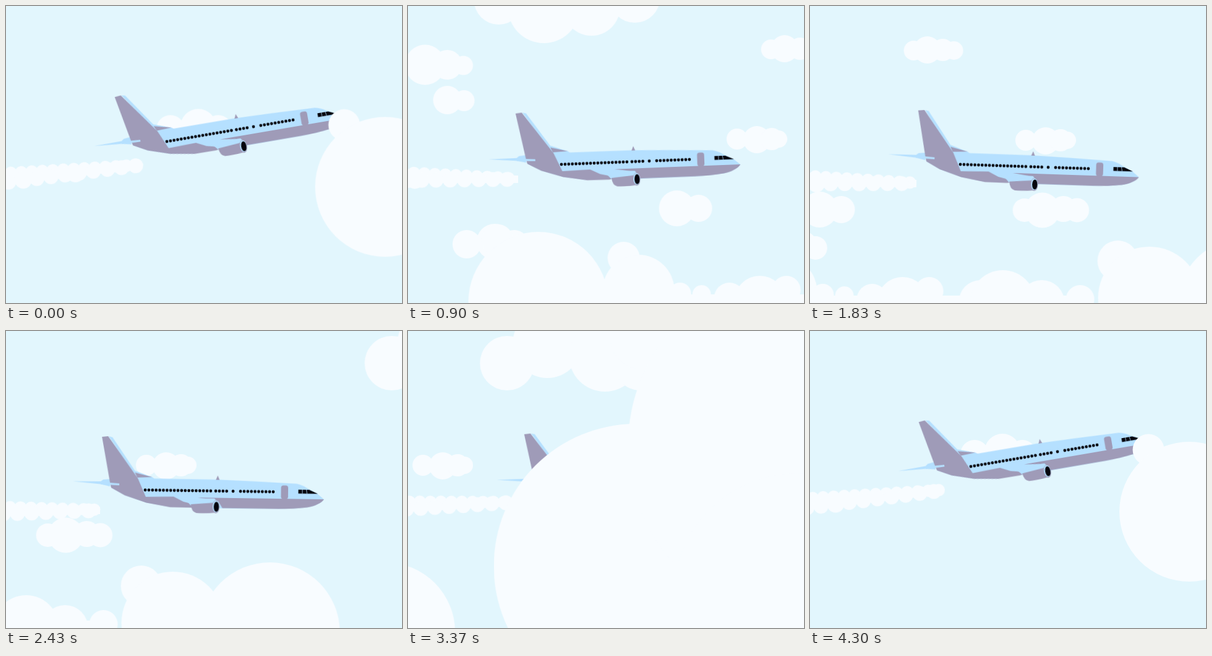
Recreate the animation shown at these times as an HTML page without scripts. Size 640 px wide and 480 px high, loop 4330 ms.

```html
<!DOCTYPE html>
<html lang="en">
<head>
<meta charset="utf-8">
<title>Plane in the clouds</title>
<style>
html, body { margin: 0; width: 100%; height: 100%; overflow: hidden; background: #e2f6fd; }
svg { display: block; width: 100vw; height: 100vh; }
.cloud { fill: #f8fcff; }
.light { fill: #b5e0ff; }
.grey { fill: #9f9bb8; }
.black { fill: #05050d; }
.anim { animation: 4330ms linear infinite; }
.near { animation-name: near; }
.far { animation-name: far; }
.pan { animation-name: pan; }
.cover { animation-name: cover; }
.plane { animation-name: plane; }
.engine { animation-name: engine; }
.trail { animation-name: trail; }
.puffs { animation-name: puffs; fill: none; stroke: #f8fcff; stroke-linecap: round; }
.windows { fill: none; stroke: #05050d; stroke-width: 4.8; stroke-linecap: round; stroke-dasharray: 0 5.88; }

/* the scene changes while the big clouds hide the plane */
@keyframes near {
  0% { transform: translateX(402px); }
  20.785% { transform: translateX(0); }
  42.263% { transform: translateX(-419px); }
  56.12% { transform: translateX(-698px); }
  69.284% { transform: translateX(-977px); }
  83.8% { transform: translateX(-1290px); }
  83.81% { transform: translateX(717px); }
  99.307%, 100% { transform: translateX(402px); }
}
@keyframes far {
  0% { transform: translateX(171px); }
  20.785% { transform: translateX(0); }
  42.263% { transform: translateX(-183px); }
  56.12% { transform: translateX(-305px); }
  69.284% { transform: translateX(-427px); }
  83.8% { transform: translateX(-564px); }
  83.81% { transform: translateX(308px); }
  99.307%, 100% { transform: translateX(171px); }
}
@keyframes pan {
  0% { transform: translateY(-186px); animation-timing-function: cubic-bezier(.35, .5, .65, 1); }
  20.785% { transform: translateY(0); }
  42.263%, 83.8% { transform: translateY(2px); }
  83.81% { transform: translateY(-416px); }
  99.307%, 100% { transform: translateY(-186px); }
}
@keyframes cover {
  0%, 69.284% { transform: translateX(945px); }
  83.834% { transform: translateX(0); }
  100% { transform: translateX(-1123px); }
}
@keyframes plane {
  0% { transform: translate(260px, 219px) rotate(-9.7deg); animation-timing-function: cubic-bezier(.3, .2, .6, .9); }
  20.785% { transform: translate(248px, 256px) rotate(-2.2deg); animation-timing-function: cubic-bezier(.3, .3, .6, 1); }
  42.263% { transform: translate(243px, 256px) rotate(1.9deg); animation-timing-function: ease-in-out; }
  56.12% { transform: translate(225px, 257px) rotate(.8deg); animation-timing-function: ease-in-out; }
  69.284% { transform: translate(260px, 251px) rotate(-1.1deg); }
  83.8% { transform: translate(262px, 249px) rotate(-2deg); }
  83.81% { transform: translate(232px, 226px) rotate(-9.7deg); }
  99.307%, 100% { transform: translate(260px, 219px) rotate(-9.7deg); }
}
@keyframes engine {
  0%, 42.263% { transform: translate(0, 0); }
  56.12%, 83.8% { transform: translate(-6px, -3px); }
  83.81%, 100% { transform: translate(0, 0); }
}
@keyframes trail {
  0% { transform: translate(212px, 258px) rotate(-5.7deg); }
  20.785% { transform: translate(178px, 280px) rotate(1deg); }
  42.263% { transform: translate(172px, 287px) rotate(1.5deg); animation-timing-function: ease-in-out; }
  56.12% { transform: translate(152px, 290px) rotate(-.5deg); animation-timing-function: ease-in-out; }
  69.284% { transform: translate(163px, 278px) rotate(-2deg); }
  83.8% { transform: translate(165px, 277px) rotate(-2deg); }
  83.81% { transform: translate(184px, 265px) rotate(-5.7deg); }
  99.307%, 100% { transform: translate(212px, 258px) rotate(-5.7deg); }
}
@keyframes puffs { to { stroke-dashoffset: -1955px; } }
</style>
</head>
<body>
<svg viewBox="0 0 640 480" preserveAspectRatio="none">
  <rect width="640" height="480" fill="#e2f6fd"/>

  <!-- far clouds -->
  <g class="anim pan cloud"><g class="anim far">
    <circle cx="95" cy="385" r="23"/>
    <circle cx="140" cy="381" r="29"/>
    <circle cx="172" cy="385" r="23"/>
    <circle cx="192" cy="389" r="19"/>
    <circle cx="532" cy="215" r="17"/>
    <circle cx="564" cy="216" r="22"/>
    <circle cx="588" cy="215" r="18"/>
    <circle cx="599" cy="215" r="14"/>
  </g></g>

  <!-- vapour trail -->
  <g class="anim trail">
    <path class="cloud" d="M0-6L-230-9V10L0 6Z"/>
    <path class="anim puffs" stroke-width="20" stroke-dasharray="0 17" d="M0-1L-240-10"/>
    <path class="anim puffs" stroke-width="24" stroke-dasharray="0 23" d="M-2 0L-240 7"/>
    <path class="anim puffs" stroke-width="28" stroke-dasharray="0 85" d="M-100 3L-240 6"/>
  </g>

  <!-- plane, with the first window at 0,0 -->
  <g class="anim plane">
    <path class="light" d="M-117-12.5L-72-13L-68-16L-57-17V-5L-72-8.5Z"/>
    <path class="light" d="M-57-12L-20-18.7L115-18.6L175-16.5L245-13.4Q255-11 260-7.6L278 2L289 11Q286 16 280 18.5Q272 23 262 24.5Q240 27.5 215 27.5L120 28L75 27L41 27L2 20.5L-33 9L-55-3Z"/>
    <path class="light" d="M-60-86L-54-84.5L-17-31L11-21L15-18H-14Z"/>
    <path class="grey" d="M-17-28L11-21L-13-20Z"/>
    <path class="grey" d="M-71-85L-61-86L-12-18.5L1 11L46 10L62 18L92 25L76 27.5L41 27.3L2 20.5L-33 9L-55-3L-57-11Z"/>
    <path class="light" d="M-72-12L-42-10V-7L-72-8Z"/>
    <path class="grey" d="M85 11H289Q286 16 280 18.5Q272 23 262 24.5Q240 27.5 215 27.5H125L118 16Z"/>
    <path class="grey" d="M114-18L117-25L120-18Z"/>
    <path class="windows" d="M0 0H106.5M114 0H132M142 0h1M154 0H207.5"/>
    <rect class="grey" x="219.5" y="-10.5" width="11.5" height="22" rx="4"/>
    <path class="black" d="M247.5-4H265L279 2.2H247.5Z"/>
    <path d="M254-4V2.2M260.5-4L261.5 2.2" stroke="#b5e0ff" stroke-width=".8"/>
    <g class="anim engine">
      <path class="light" d="M70 16L118 15L122 20L118 28L80 27Z"/>
      <path class="grey" d="M80 25L117 22L120 38Q105 40 89 39Q81 37 80 25Z"/>
      <ellipse class="grey" cx="120.5" cy="28.5" rx="6" ry="10.5"/>
      <ellipse class="light" cx="120.5" cy="28" rx="5.3" ry="9.5"/>
      <ellipse class="black" cx="121.3" cy="28.5" rx="4.2" ry="8"/>
    </g>
  </g>

  <!-- near clouds -->
  <g class="anim pan cloud"><g class="anim near">
    <circle cx="145" cy="378" r="25.5"/>
    <circle cx="211" cy="478" r="113"/>
    <circle cx="349" cy="407" r="26"/>
    <circle cx="373" cy="460" r="58"/>
    <circle cx="440" cy="465" r="18"/>
    <circle cx="475" cy="466" r="15"/>
    <circle cx="520" cy="472" r="25"/>
    <circle cx="569" cy="477" r="41"/>
    <circle cx="612" cy="459" r="23"/>
    <rect x="300" y="466" width="560" height="20"/>

    <circle cx="28" cy="95" r="32.5"/>
    <circle cx="64" cy="95" r="24"/>
    <circle cx="90" cy="96" r="15.5"/>
    <circle cx="64" cy="152" r="23"/>
    <circle cx="91" cy="153" r="17"/>
    <circle cx="147" cy="-10" r="40"/>
    <circle cx="220" cy="2" r="58"/>
    <circle cx="297" cy="2" r="46"/>
    <circle cx="367" cy="-14" r="41"/>

    <circle cx="435" cy="327" r="29"/>
    <circle cx="470" cy="327" r="22"/>
    <circle cx="587" cy="70" r="16"/>
    <circle cx="609" cy="69" r="22"/>
    <circle cx="634" cy="69" r="18"/>
    <circle cx="652" cy="70" r="15"/>
    <circle cx="766" cy="328" r="19"/>
    <circle cx="795" cy="328" r="28.5"/>
    <circle cx="829" cy="326" r="21"/>
    <circle cx="851" cy="328" r="19.5"/>

    <circle cx="695" cy="476" r="35"/>
    <circle cx="731" cy="478" r="53"/>
    <circle cx="794" cy="478" r="37"/>
    <circle cx="856" cy="472" r="23"/>
    <circle cx="917" cy="410" r="33"/>
    <circle cx="968" cy="470" r="83"/>
    <circle cx="1125" cy="485" r="113"/>

    <circle cx="1322" cy="50" r="44"/>
    <circle cx="1387" cy="18" r="56"/>
    <circle cx="1480" cy="38" r="58"/>
    <circle cx="1538" cy="48" r="46"/>
    <circle cx="1540" cy="8" r="52"/>
    <circle cx="1590" cy="8" r="52"/>
    <circle cx="1607" cy="56" r="57"/>
  </g></g>

  <!-- cover -->
  <g class="anim cover cloud">
    <circle cx="-20" cy="380" r="230"/>
    <circle cx="250" cy="185" r="283"/>
    <circle cx="240" cy="430" r="200"/>
    <circle cx="560" cy="461" r="250"/>
  </g>
</svg>
</body>
</html>
```
